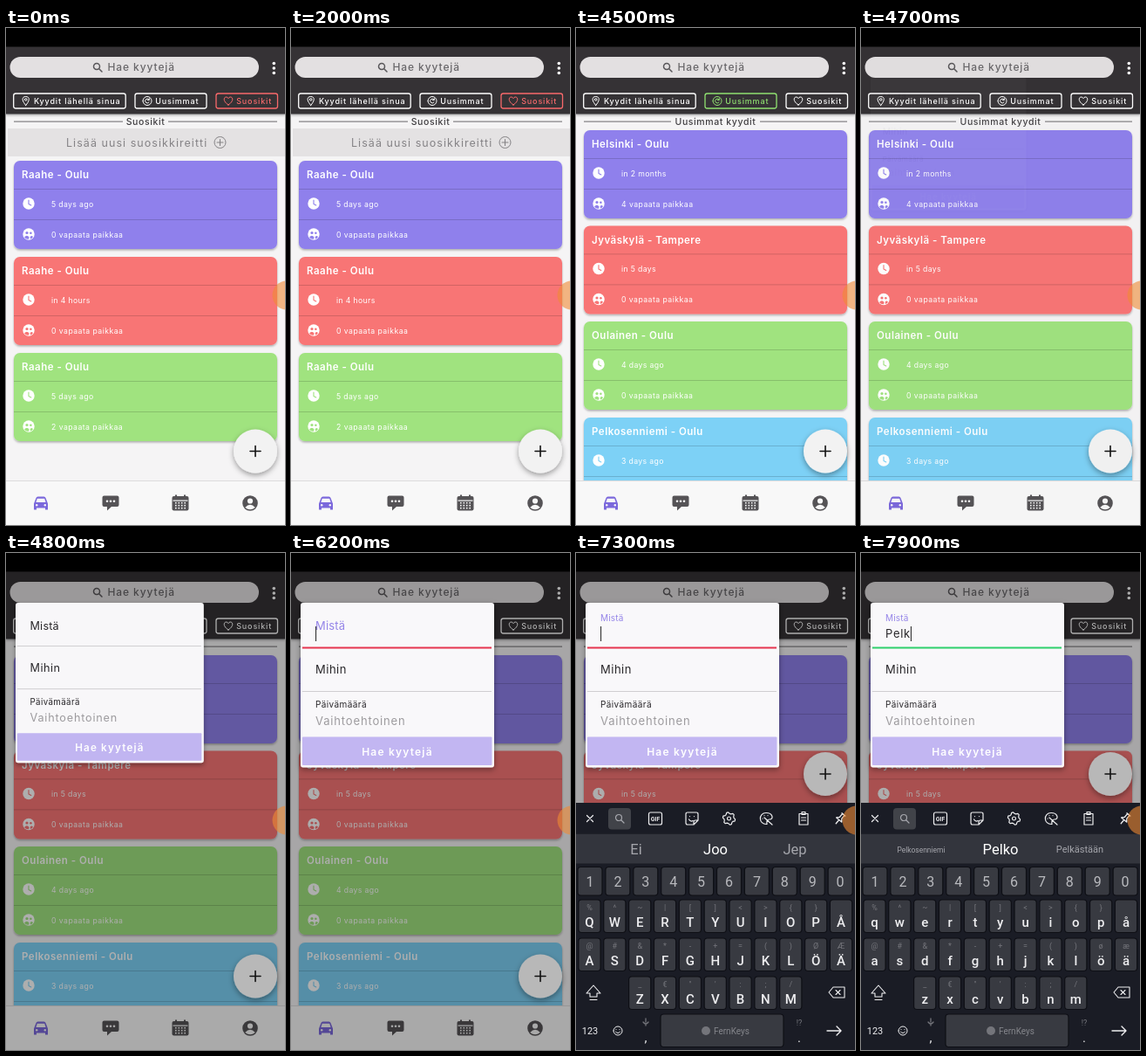
These frames come from a looping animation (320 px wide and 569 px high, 8 s). An HTML page:

```html
<!DOCTYPE html>
<html lang="fi">
<head>
<meta charset="utf-8">
<title>Kyydit</title>
<style>
html, body { margin: 0; width: 100%; height: 100%; overflow: hidden; background: #000; }
svg { display: block; width: 100%; height: 100%; }
text { font-family: Inter, Roboto, sans-serif; white-space: pre; }
#board text { font-family: Roboto, "Noto Sans", sans-serif; }
.caps text { text-transform: uppercase; }
.line { fill: none; stroke-linecap: round; stroke-linejoin: round; }
.key { stroke: #0e0f15; stroke-width: 1.2; }
</style>
</head>
<body>
<svg id="stage" viewBox="0 0 320 569" preserveAspectRatio="none"></svg>
<script>
const LOOP = 8000;
const $ = id => document.getElementById(id);
const set = (id, name, value) => $(id).setAttribute(name, value);
const clamp = v => Math.max(0, Math.min(1, v));
const span = (t, start, len) => clamp((t - start) / len);
const easeOut = p => 1 - (1 - p) ** 4.8;

// SVG markup helpers
const text = (x, y, s, size, fill, ls = 0, extra = '') =>
  `<text x="${x}" y="${y}" font-size="${size}" fill="${fill}" letter-spacing="${ls}" ${extra}>${s}</text>`;
const rect = (x, y, w, h, fill, r = 0, extra = '') =>
  `<rect x="${x}" y="${y}" width="${w}" height="${h}" rx="${r}" fill="${fill}" ${extra}/>`;
const circle = (x, y, r, fill, extra = '') => `<circle cx="${x}" cy="${y}" r="${r}" fill="${fill}" ${extra}/>`;
const path = (d, stroke, w = 1, extra = '') =>
  `<path class="line" d="${d}" stroke="${stroke}" stroke-width="${w}" ${extra}/>`;
const at = (x, y, body, extra = '') => `<g transform="translate(${x} ${y})" ${extra}>${body}</g>`;
const group = (id, body, extra = '') => `<g id="${id}" ${extra}>${body}</g>`;
const MID = 'text-anchor="middle"';
const SEMI = 'font-weight="600"';
const MEDIUM = 'font-weight="500"';

const PURPLE = '#8f80ec', RED = '#f87475', GREEN = '#a0e37f', BLUE = '#7dd1f6';

const heart = 'M0 4.5C-7 0-5-4.5-2.5-4.5Q-.8-4.5 0-2.8Q.8-4.5 2.5-4.5C5-4.5 7 0 0 4.5Z';
const pin = 'M0 5C-6-2-3.5-5 0-5S6-2 0 5ZM-1.3-1.6a1.3 1.3 0 1 0 2.6 0a1.3 1.3 0 1 0-2.6 0';
const refresh = 'M-5 0a5 5 0 1 0 10 0a5 5 0 1 0-10 0M2-1.5A2.4 2.4 0 1 0 2 1.5M2.3-2.8V-1H.5';
const lens = 'M-4.5-1a3.5 3.5 0 1 0 7 0a3.5 3.5 0 1 0-7 0M1.5 1.5L5 5';

function card(y, title, when, seats, fill) {
  const rule = dy => rect(9, y + dy, 302, .8, '#000', 0, 'opacity=".2"');
  const people = circle(0, 0, 6.7, '#fff') + circle(-2, -1.5, 1.6, fill) + circle(2.4, -1.2, 1.3, fill) +
    `<path d="M-5 3.6Q-2-.2 .6 3.6L0 5.8Q-3.5 6-5 3.6M1.8 5.4V3Q3.5 .8 5 3.2Q4 5 1.8 5.4" fill="${fill}"/>`;
  return rect(9, y, 302, 101, fill, 7, 'filter="url(#soft)"') +
    text(18, y + 20, title, 11.5, '#fff', .5, SEMI) + rule(32) + rule(67) +
    at(26, y + 49, circle(0, 0, 6.7, '#fff') + path('M0-4V.4L2.8 2', fill, 1.1)) +
    text(52, y + 52.6, when, 8.7, '#fff', .35) +
    at(26, y + 84, people) + text(52, y + 87.6, seats + ' vapaata paikkaa', 8.7, '#fff', .45);
}

const heading = (s, gap) =>
  rect(9, 106.6, 151 - gap, 1, '#6b696c') + rect(160 + gap, 106.6, 151 - gap, 1, '#6b696c') +
  text(160, 110.5, s, 10.5, '#3f3d40', .6, `${MID} ${MEDIUM}`);

const tab = (id, x, w, icon, s) => group(id,
  rect(x, 75, w, 17, 'none', 2.5, 'stroke="currentColor" stroke-width="1.3"') +
  at(x + 14, 83.5, path(icon, 'currentColor')) +
  text(x + 23.2, 86.8, s, 9, 'currentColor', .85, MEDIUM));

const header = rect(0, 0, 320, 98.5, '#353336', 0, 'filter="url(#soft)"') + rect(0, 0, 320, 21.5, '#000') +
  rect(4.5, 33, 285.5, 24, '#e3e0e1', 12) + at(105, 45, path(lens, '#59575a', 1.5)) +
  text(116.5, 49, 'Hae kyytejä', 12, '#69676a', .9, MEDIUM) +
  [40.5, 46, 51.5].map(y => circle(307.3, y, 1.8, '#fff')).join('') +
  tab('near', 8.7, 128.5, pin, 'Kyydit lähellä sinua') +
  tab('newest', 148, 82, refresh, 'Uusimmat') + tab('liked', 241, 70.5, heart, 'Suosikit');

const favourites = group('favourites', heading('Suosikit', 26) +
  rect(2, 115, 318, 32, '#e4e2e3') + text(69, 135.8, 'Lisää uusi suosikkireitti', 12.5, '#858386', 1.05) +
  at(245.5, 131, circle(0, 0, 6.5, 'none', 'stroke="#858386"') + path('M-3.5 0H3.5M0-3.5V3.5', '#858386', 1.1)) +
  card(152, 'Raahe - Oulu', '5 days ago', 0, PURPLE) +
  card(262, 'Raahe - Oulu', 'in 4 hours', 0, RED) +
  card(372, 'Raahe - Oulu', '5 days ago', 2, GREEN));

const rides = group('rides', heading('Uusimmat kyydit', 51) + group('rideCards',
  card(117, 'Helsinki - Oulu', 'in 2 months', 4, PURPLE) +
  card(226.5, 'Jyväskylä - Tampere', 'in 5 days', 0, RED) +
  card(336, 'Oulainen - Oulu', '4 days ago', 0, GREEN) +
  card(446, 'Pelkosenniemi - Oulu', '3 days ago', 1, BLUE)));

const calendarDots = [-5.2, -1.7, 1.7, 5.2].map(x => [-.3, 2.7, 5.7].map(y =>
  rect(x - .8, y - .8, 1.6, 1.6, '#f8f8f8')).join('')).join('');
const nav = rect(0, 518, 320, 51, '#f8f8f8') + rect(0, 518, 320, 1, '#dddcdd') +
  at(40, 543.5, '<path d="M-8 8V1l2.5-6.5q.5-1.5 2-1.5h7q1.5 0 2 1.5L8 1V8H5V6H-5V8Z" fill="#7b68dc"/>' +
    '<path d="M-5.6-.4L-4.2-4.8H4.2L5.6-.4Z" fill="#f8f8f8"/>' +
    circle(-4.8, 2.8, 1.2, '#f8f8f8') + circle(4.8, 2.8, 1.2, '#f8f8f8')) +
  at(120, 543.5, '<path d="M-7.5-8h15q2 0 2 2v8.5q0 2-2 2H1L-4 9V4.5H-7.5q-2 0-2-2V-6q0-2 2-2Z" fill="#555356"/>' +
    [-4, 0, 4].map(x => circle(x, -1.7, 1.3, '#f8f8f8')).join('')) +
  at(200, 544, rect(-9.5, -8, 19, 16.5, '#555356', 2) + rect(-8.5, -3.5, 17, 1.2, '#f8f8f8') + calendarDots +
    rect(-6, -9.5, 2, 3, '#555356') + rect(4, -9.5, 2, 3, '#555356')) +
  at(280, 544, circle(0, 0, 8.8, '#555356') + circle(0, -2.5, 3.1, '#f8f8f8') +
    '<path d="M-5.8 5Q0-1.5 5.8 5Q0 9.5-5.8 5" fill="#f8f8f8"/>');

const popover = group('popover',
  rect(11, 57, 222, 188.5, '#f9f8fa', 3, 'filter="url(#deep)"') +
  group('fromLabel', text(0, 0, 'Mistä', 13, 'currentColor', .2)) +
  text(28, 97, '', 13, '#29272a', .7, 'id="typed"') +
  rect(28, 84, 1.1, 17, '#333', 0, 'id="caret"') +
  rect(13, 107.5, 217, 1, '#d0ced1', 0, 'id="underline"') +
  text(28, 138, 'Mihin', 13, '#29272a', .5) + rect(13, 158, 217, 1, '#d0ced1') +
  text(28, 177, 'Päivämäärä', 10, '#29272a', .4) +
  text(28, 197, 'Vaihtoehtoinen', 13, '#9d9b9e', .85) +
  rect(13, 210.5, 217.5, 32.5, '#c2b6f2', 1) +
  text(122, 231.5, 'Hae kyytejä', 12, '#fff', 1.2, `${MID} ${SEMI}`));

// Keyboard
const ROWS = [
  { y: 397, from: 0, keys: 'qwertyuiopå', alt: '%^~|[]&lt;&gt;{} ' },
  { y: 441, from: 0, keys: 'asdfghjklöä', alt: '@#&amp;*-+=()øæ' },
  { y: 485, from: 2, keys: 'zxcvbnm', alt: '_€"\':;/' }
];
const BOARD = '#1a1c25', KEY = '#383a41', INK = '#eeeef0', DIM = '#74757b';
const symbols = s => s.match(/&\w+;|./gu);
const keycap = (x, y, w, h, id = '') => rect(x - w / 2, y, w, h, KEY, 3.5, `class="key" ${id}`);
const letters = ROWS.map(row => {
  const alts = symbols(row.alt);
  return [...row.keys].map((c, i) => {
    const x = 15.5 + (row.from + i) * 28.85;
    return keycap(x, row.y, 25.2, 37.5, `id="key-${c}"`) +
      text(x, row.y + 11.5, alts[i], 9, DIM, 0, MID) +
      text(x, row.y + 30.5, c, 15, INK, 0, `${MID} ${MEDIUM}`);
  }).join('');
}).join('');
const digits = [...'1234567890'].map((c, i) => {
  const x = 16 + i * 31.9;
  return keycap(x, 359.5, 28, 32.5) + text(x, 381.5, c, 16, '#b9babe', 0, MID);
}).join('');
const smile = 'M-5 0a5 5 0 1 0 10 0a5 5 0 1 0-10 0M-2.5 1.2Q0 4 2.5 1.2M-2-1.5V-1.4M2-1.5V-1.4';
const board = group('board', rect(0, 321, 320, 248, BOARD) + rect(0, 321.5, 320, 34, '#33353d') +
  [69, 160, 251].map((x, i) => text(x, 339.5, '', 16, i == 1 ? '#fff' : '#a5a6ac', 0,
    `${MID} dominant-baseline="central" id="hint${i}"`)).join('') +
  digits + group('letters', letters) +
  at(20, 503, path('M-8 1L0-8L8 1H4V5H-4V1ZM-4 8.5H4', INK, 1.1)) +
  at(299, 503, path('M-9 0L-4-6H9V6H-4ZM-1-2.5L4 2.5M4-2.5L-1 2.5', INK, 1.1)) +
  text(16, 551, '123', 11, INK, 0, MID) + at(48, 547, path(smile, INK)) +
  at(80, 537, path('M0-4V0M-3 0Q0 4 3 0M0 2V4', DIM, 1.3)) + text(80, 560, ',', 15, INK, 0, MID) +
  keycap(167.5, 528, 141, 37.5) + circle(149, 547, 5, DIM) +
  text(158, 550.5, 'FernKeys', 10, '#85868c') +
  text(256, 541, '!?', 9, DIM, 0, MID) + text(256, 560, '.', 15, INK, 0, MID) +
  at(296, 547, path('M-8 0H8M3-5L8 0L3 5', INK, 1.4)));

const gear = Array.from({ length: 24 }, (_, i) => {
  const a = (i + .5) * Math.PI / 12, r = i % 4 < 2 ? 7.2 : 5.6;
  return `${i ? 'L' : 'M'}${(r * Math.cos(a)).toFixed(1)} ${(r * Math.sin(a)).toFixed(1)}`;
}).join('') + 'ZM-2 0a2 2 0 1 0 4 0a2 2 0 1 0-4 0';
const tool = (x, d) => at(x, 304, path(d, INK, 1.2));
const toolbar = group('toolbar', rect(0, 286, 320, 35.5, BOARD) +
  tool(16, 'M-3.5-3.5L3.5 3.5M3.5-3.5L-3.5 3.5') +
  rect(37, 292, 26, 24.5, '#414349', 4) + at(50, 304, path(lens, '#a5a6ac', 1.2)) +
  rect(83.5, 297, 15, 14, 'none', 2, `stroke="${INK}" stroke-width="1.2"`) +
  text(91, 306.7, 'GIF', 6.5, INK, 0, `${MID} font-weight="700"`) +
  tool(133, 'M-5-7H5Q7-7 7-5V2L2 7H-5Q-7 7-7 5V-5Q-7-7-5-7M2 7V4Q2 2 4 2H7M-3.5 1Q-1.5 4 1 2.5M-2.5-2.5V-2.4M2.5-2.5V-2.4') +
  tool(175.5, gear) +
  tool(218, 'M1 6.5C-9 7-9-6.5 0-6.5C8-6.5 9 1 4 1Q0 1 1 6.5M-4 0V.1M-2-3.5V-3.4M2-3.5V-3.4M-2-1L7 7') +
  tool(261, 'M-5-5.5H5V7H-5ZM-2-7.5H2V-4.5H-2ZM-2.5-1H2.5M-2.5 2H2.5') +
  at(303, 304, path('M-2.5-6H2.5M-1.5-6V-1L-4 2H4L1.5-1V-6M0 2V7.5', INK, 1.3, 'transform="rotate(40)"')));

const fab = group('fab', circle(0, 0, 25, '#f2f2f2', 'id="fabDisc" filter="url(#deep)"') +
  path('M-6 0H6M0-6V6', '#111', 1.6));

$('stage').innerHTML = `<defs>
  <filter id="soft" x="-10%" y="-10%" width="120%" height="130%"><feDropShadow dx="0" dy="1.5" stdDeviation="1.3" flood-opacity=".3"/></filter>
  <filter id="deep" x="-30%" y="-30%" width="160%" height="160%"><feDropShadow dx="0" dy="2.5" stdDeviation="3" flood-opacity=".38"/></filter>
  </defs>` + rect(0, 0, 320, 569, '#f5f4f5') + favourites + rides + header + nav +
  rect(0, 21.5, 320, 547.5, '#000', 0, 'id="shade"') +
  rect(0, 321, 320, 248, '#302e31', 0, 'id="blank"') + fab + popover + board + toolbar +
  circle(322, 306, 16.5, '#f08a35', 'opacity=".6"');

const STROKES = [['p', 7400], ['e', 7600], ['l', 7700], ['k', 7900]];
const HINTS = [
  ['Ei', 'Joo', 'Jep'],
  ['Pitää', 'P', 'Päivä'],
  ['Perjantaina', 'Pe', 'Pelkkä'],
  ['Pelit', 'Pel', 'Peli'],
  ['Pelkosenniemi', 'Pelko', 'Pelkästään']
];

const show = (id, on) => set(id, 'display', on ? 'inline' : 'none');

function drawList(t) {
  const swapped = t >= 2400;
  show('favourites', !swapped);
  show('rides', swapped);
  set('rideCards', 'opacity', span(t, 2350, 300));
  set('near', 'color', '#fff');
  set('newest', 'color', swapped && t < 4600 ? '#8fe070' : '#fff');
  set('liked', 'color', swapped ? '#fff' : '#f8696b');
}

function drawPopover(t, count) {
  const fade = easeOut(span(t, 4700, 150));
  const scale = .8 + .2 * easeOut(span(t, 4700, 300));
  const lift = span(t, 6200, 150);
  set('shade', 'opacity', .32 * fade);
  set('popover', 'opacity', fade);
  set('popover', 'transform', `translate(11 57) scale(${scale}) translate(-11 -57)`);
  set('fromLabel', 'transform', `translate(28 ${88.5 - 11 * lift}) scale(${1 - .23 * lift})`);
  set('fromLabel', 'color', lift ? '#9585e8' : '#29272a');
  $('typed').textContent = 'Pelk'.slice(0, count);
  show('caret', lift > 0);
  set('caret', 'x', 28 + (count ? $('typed').getComputedTextLength() : 0));
  set('underline', 'height', lift ? 2 : 1);
  set('underline', 'fill', !lift ? '#d0ced1' : count ? '#2fd06c' : '#e6354f');
  const grey = Math.round(242 - 58 * fade);
  set('fabDisc', 'fill', `rgb(${grey},${grey},${grey})`);
}

function drawKeyboard(t, count) {
  const open = t >= 6800;
  show('blank', t >= 6350);
  show('toolbar', open);
  show('fab', t < 6350 || open);
  set('fab', 'transform', `translate(286 ${open ? 253 : 484.5})`);
  set('board', 'transform', `translate(0 ${248 * (1 - easeOut(span(t, 6400, 350)))})`);
  set('letters', 'class', count ? '' : 'caps');
  for (const [c, time] of STROKES) set('key-' + c, 'fill', t >= time - 80 && t < time ? '#62646c' : KEY);
  HINTS[count].forEach((word, i) => {
    $('hint' + i).textContent = word;
    set('hint' + i, 'font-size', Math.min(16.5, 110 / word.length));
  });
}

function draw(t) {
  const count = STROKES.filter(([, time]) => t >= time).length;
  drawList(t);
  drawPopover(t, count);
  drawKeyboard(t, count);
}

const start = performance.now();
function tick(now) {
  draw(Math.max(0, now - start) % LOOP);
  requestAnimationFrame(tick);
}
draw(0);
requestAnimationFrame(tick);
</script>
</body>
</html>
```
